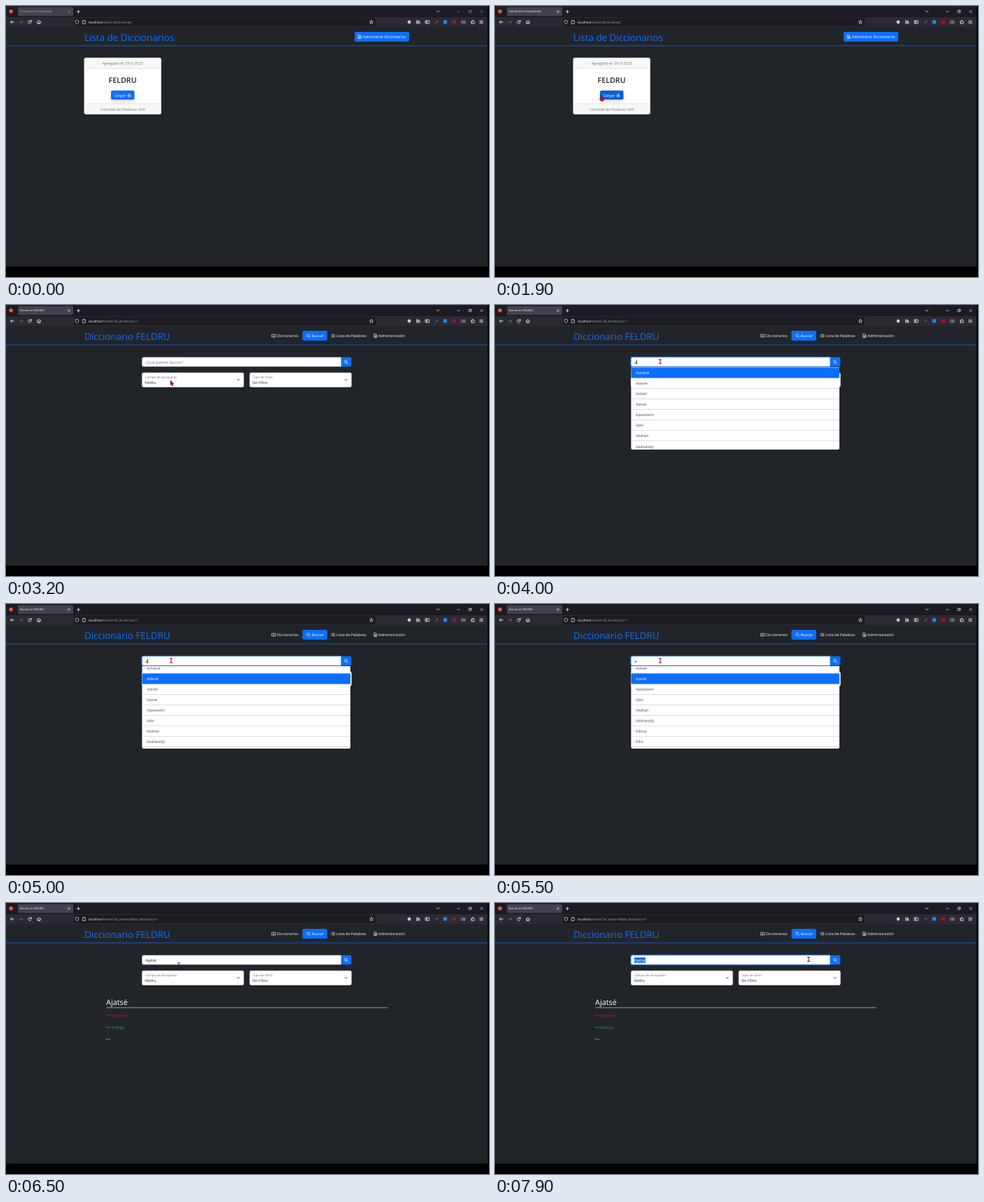
An HTML page with a canvas that plays this animation: 690 px wide and 388 px high, repeating every 8000 ms.

```html
<!DOCTYPE html>
<html lang="es">
<head>
<meta charset="utf-8">
<title>Diccionario</title>
<style>
  html, body { margin: 0; width: 100%; height: 100%; overflow: hidden; background: #000; }
  canvas { display: block; width: 690px; height: 388px; }
</style>
</head>
<body>
<canvas id="stage"></canvas>
<script>
const W = 690, H = 388, LOOP = 8000, STEP = 100;
const canvas = document.getElementById('stage');
const c = canvas.getContext('2d');
const dpr = window.devicePixelRatio || 1;
canvas.width = W * dpr;
canvas.height = H * dpr;

const BLUE = '#0d6efd', DARK = '#212529', GREY = '#6c757d', PALE = '#fbfbfe', RED = '#b3002d';
const NAME = 'FELDRU', NAME_LOW = 'Feldru', BODY = 5.42;
const WORDS = ['Achatrë', 'Adartë', 'Adrieh', 'Ajatsë', 'Ajaxetsem', 'Ajïkr',
  'Akálian', 'Akálian(ëj)', 'Alidue', 'Állin', 'Amárie'];

// Moments of the story in ms
const T = { active: 1200, home: 2300, focus: 3500, typed: 4000, down: 4900, enter: 5700,
  result: 5800, refocus: 7400, select: 7600 };

// Pointer path: time, x, y
const PATH = [[1300, 476, 382], [1400, 466, 366], [1600, 305, 107], [1800, 152, 128.5],
  [2300, 152, 128.5], [2700, 184, 138], [3100, 240, 136], [3200, 235, 108], [3400, 236, 81],
  [6400, 236, 81], [6500, 247, 89], [6700, 257, 102], [7000, 276, 101], [7300, 299, 81],
  [7400, 296, 81], [7600, 165, 81], [7900, 448, 80.5]];

function pointer(t) {
  if (t < PATH[0][0]) return null;
  let i = 0;
  while (i < PATH.length - 2 && PATH[i + 1][0] <= t) i++;
  const [t0, x0, y0] = PATH[i], [t1, x1, y1] = PATH[i + 1];
  const k = Math.min(1, (t - t0) / (t1 - t0));
  return { x: x0 + (x1 - x0) * k, y: y0 + (y1 - y0) * k };
}

// ---- drawing helpers ----
function rect(x, y, w, h, color) {
  c.fillStyle = color;
  c.fillRect(x, y, w, h);
}
function box(x, y, w, h, r, color, border) {
  c.beginPath();
  c.roundRect(x, y, w, h, r);
  if (color) { c.fillStyle = color; c.fill(); }
  if (border) { c.strokeStyle = border; c.lineWidth = 0.6; c.stroke(); }
}
function dot(x, y, r, color) {
  c.beginPath();
  c.arc(x, y, r, 0, 7);
  c.fillStyle = color;
  c.fill();
}
// y is the visual middle of the line
function text(s, x, y, size, color, weight = 400, align = 'left') {
  c.font = `${weight} ${size}px "Open Sans", "Noto Sans", sans-serif`;
  c.textAlign = align;
  c.fillStyle = color;
  c.fillText(s, x, y + size * 0.345);
  return c.measureText(s).width;
}
// Strokes an SVG path whose origin is the icon's middle
function icon(d, x, y, color = PALE, width = 0.8) {
  c.save();
  c.translate(x, y);
  c.strokeStyle = color;
  c.lineWidth = width;
  c.lineCap = c.lineJoin = 'round';
  c.stroke(new Path2D(d));
  c.restore();
}

const ICON = {
  close: 'M-1.5-1.5L1.5 1.5M1.5-1.5L-1.5 1.5',
  plus: 'M-2 0H2M0-2V2',
  down: 'M-1.8-.9L0 .9L1.8-.9',
  back: 'M2.4 0H-2.4M-.3-2.1L-2.4 0L-.3 2.1',
  forward: 'M-2.4 0H2.4M.3-2.1L2.4 0L.3 2.1',
  reload: 'M2-.8A2.2 2.2 0 1 0 2 1M2.2-2.6V-.8H.5',
  home: 'M-2.6 0L0-2.4L2.6 0M-1.9-.5V2.3H1.9V-.5M0 2.2V.8',
  shield: 'M0-2.6L2.2-1.8V0Q2 1.8 0 2.7Q-2 1.8-2.2 0V-1.8Z',
  page: 'M-1.8-2.5H.6L1.8-1.2V2.5H-1.8ZM.5-2.4V-1.1H1.7',
  star: 'M0-2.6L.8-.8L2.6-.7L1.2.5L1.7 2.4L0 1.4L-1.7 2.4L-1.2.5L-2.6-.7L-.8-.8Z',
  library: 'M-2.3-2.2V2.3M-.9-2.2V2.3M.4-1.6V2.3M1-1.5L2.5 2.2',
  panel: 'M-2.6-2H2.6V2H-2.6ZM-.5-2V2M-1.9-.8H-1.2M-1.9.3H-1.2',
  slash: 'M-1.7 1.9L1.5-1.3M1.1-2L2.1-.9',
  frame: 'M-2.5-1.9H2.5V1.9H-2.5ZM-1.4-.6V.8M0-.6V.8M1.4-.6V.8',
  puzzle: 'M-2.2-1H-.8V-2.3H.6V-1H2.1V2.3H-2.2V1.2H-1V.1H-2.2Z',
  menu: 'M-2.2-1.7H2.2M-2.2 0H2.2M-2.2 1.7H2.2',
  book: 'M0-1.5Q-1.4-2.4-2.7-1.8V1.9Q-1.3 1.4 0 2.1Q1.3 1.4 2.7 1.9V-1.8Q1.4-2.4 0-1.5V2',
  search: 'M1.3-.5A1.9 1.9 0 1 1-2.5-.5A1.9 1.9 0 1 1 1.3-.5M.8.9L2.5 2.6',
  list: 'M-1-1.7H2.5M-1 0H2.5M-1 1.7H2.5M-2.5-1.7H-2.3M-2.5 0H-2.3M-2.5 1.7H-2.3',
  file: 'M-1.9-2.6H.7L1.9-1.4V2.6H-1.9ZM-.9-.4H.9M-.9.6H.9M-.9 1.6H.5',
  load: 'M-1.1-.7H-2V2.2H2V-.7H1.1M0-2.5V.9M-.9 0L0 .9L.9 0',
  turn: 'M-2.6-1.7V.4H2.6M1.1-1L2.6.4L1.1 1.8'
};

// ---- browser ----
function browser(t) {
  const lit = t >= T.active ? PALE : '#8b8a94';
  rect(0, 0, 688, 15.5, '#1c1b22');
  rect(0, 15.5, 688, 14.5, '#2b2a33');
  dot(7.2, 7.8, 2.8, '#f0503c');
  box(17, 1.6, 79, 12.6, 1.6, '#42414d');
  text(t < T.home ? 'Diccionarios Disponibles' : 'Buscar en ' + NAME, 20, 8, 4.04, t >= T.active ? PALE : '#b0afb8');
  icon(ICON.close, 90, 8, lit, 0.6);
  icon(ICON.plus, 103.5, 8);
  icon(ICON.down, 617, 7.8);
  icon('M-1.7 0H1.7', 646.5, 8, lit, 0.6);
  icon('M-1.6-1.2H1.1V1.6H-1.6ZM-.8-1.9H1.8V.8', 663, 8, lit, 0.6);
  icon(ICON.close, 679.5, 8, lit, 0.6);

  icon(ICON.back, 9, 23);
  icon(ICON.forward, 21.5, 23, '#6b6a73');
  icon(ICON.reload, 34, 23);
  icon(ICON.home, 47, 23);
  box(97, 17, 431, 12, 1.6, '#1c1b22');
  icon(ICON.shield, 101.5, 23, PALE, 0.6);
  icon(ICON.page, 111.5, 23, PALE, 0.6);
  const path = t < T.home ? '/select-dictionaries/'
    : t < T.enter ? '/home/?id_dictionary=1' : '/home/?id_word=58&id_dictionary=1';
  const w = text('localhost', 118, 23, 4.65, PALE);
  text(path, 118 + w, 23, 4.65, '#a9a8b2');
  icon(ICON.star, 522, 23, PALE, 0.6);
  dot(576, 23, 2.4, '#c9c8d0');
  icon(ICON.library, 589, 23);
  icon(ICON.panel, 602, 23, PALE, 0.7);
  icon(ICON.slash, 615, 23, '#9a99a3', 0.7);
  rect(624.8, 20.2, 5.2, 5.2, '#2f7de8');
  rect(638, 20.4, 5, 5, '#a8101c');
  icon(ICON.frame, 653.5, 23, '#b5b4be', 0.6);
  icon(ICON.puzzle, 667, 23, PALE, 0.7);
  icon(ICON.menu, 679, 23, PALE, 0.7);
}

function header(title) {
  rect(0, 30, 688, 343, DARK);
  text(title, 112, 45, 13.4, BLUE);
  rect(0, 56.6, 688, 0.8, '#1861d6');
}

// ---- first page ----
function listPage(hover) {
  header('Lista de Diccionarios');
  box(498, 37, 78, 14, 2, BLUE);
  icon(ICON.file, 505.3, 44, '#fff', 0.6);
  text('Administrar Diccionarios', 509.6, 44.2, BODY, '#fff');

  box(111.8, 74.3, 109.8, 80.6, 2.2, '#fff', '#d0cbd8');
  box(112.2, 74.7, 109, 14.9, [2, 2, 0, 0], '#f7f7f7');
  box(112.2, 140, 109, 14.5, [0, 0, 2, 2], '#f7f7f7');
  rect(112, 89.4, 109.4, 0.5, '#d6d6d8');
  rect(112, 139.6, 109.4, 0.5, '#d6d6d8');
  text('Agregado el: 29-3-2023', 166.6, 82.6, BODY, GREY, 400, 'center');
  text(NAME, 166.6, 106, 10.7, DARK, 600, 'center');
  c.save();
  c.shadowColor = 'rgba(0,0,0,.18)';
  c.shadowBlur = 5 * dpr;
  c.shadowOffsetY = 2.5 * dpr;
  box(150, 121, 33.5, 13, 2, hover ? '#0b5ed7' : BLUE);
  c.restore();
  text('Cargar', 154.4, 127.8, BODY, '#fff');
  icon(ICON.load, 176, 127.8, '#fff', 0.6);
  text('Cantidad de Palabras: 629', 166.6, 147.8, 5.25, GREY, 400, 'center');
}

// ---- second page ----
function navItem(glyph, x, label, textX) {
  icon(glyph, x, 44, '#fff', 0.6);
  text(label, textX, 44.2, BODY, '#fff');
}
function picker(x, label, value) {
  box(x, 97, 145.2, 20.5, 2, '#fff', '#ced4da');
  text(label, x + 4.5, 103.6, 4.63, GREY);
  text(value, x + 3.8, 110.8, BODY, DARK);
  icon(ICON.down, x + 137.6, 107.2, '#343a40', 0.8);
}
function caret(x) {
  rect(x, 78.2, 0.7, 7, '#111');
}

function field(t) {
  const focus = (t >= T.focus && t < T.result) || t >= T.refocus;
  if (focus) box(192.8, 73.4, 287, 16.2, 3, 'rgba(13,110,253,.5)');
  box(478, 74.8, 15.4, 13.4, [0, 2, 2, 0], BLUE);
  icon(ICON.search, 486, 81.6, '#fff', 0.7);
  box(194.5, 74.9, 284, 13.2, [2, 0, 0, 2], '#fff', focus ? '#86b7fe' : '#ced4da');
  const blinkOn = t < 4200 || (t >= 4700 && t < 5200);
  if (t < T.typed) {
    text('¿Que quieres buscar?', 199.3, 82, BODY, GREY);
    if (focus) caret(199);
  } else if (t < T.enter) {
    text('a', 199.3, 82, BODY, DARK);
    if (blinkOn) caret(202.3);
  } else {
    const picked = t >= T.select;
    if (picked) rect(199, 78, 16, 7.6, '#0f6fd0');
    text(WORDS[3], 199.3, 82, BODY, picked ? '#fff' : DARK);
    if (focus && !picked) caret(215.5);
  }
}

// Three key presses, each easing the list one row further
function suggestions(t) {
  const row = 15.05, top = 89, height = 118;
  const presses = t < T.down ? 0 : Math.min(3, 1 + Math.floor((t - T.down) / 200));
  const goal = n => Math.max(0, n * row - 10);
  let scroll = 0;
  if (presses) {
    const k = Math.min(1, (t + STEP - T.down - (presses - 1) * 200) / 200);
    const ease = 1 - (1 - k) * (1 - k);
    scroll = goal(presses - 1) + (goal(presses) - goal(presses - 1)) * ease;
  }
  c.save();
  c.beginPath();
  c.roundRect(194.4, top, 297.6, height, [0, 0, 2, 2]);
  c.clip();
  rect(194, top, 299, height, '#fff');
  WORDS.forEach((word, i) => {
    const y = top + 0.5 + i * row - scroll, on = i === presses;
    if (on) rect(194, y, 299, row, BLUE);
    else rect(194, y + row - 0.5, 299, 0.6, '#c4c8cd');
    text(word, 201, y + 7.8, BODY, on ? '#fff' : '#4a4f55');
  });
  c.restore();
}

function entry() {
  text(WORDS[3], 143, 142.6, 10.9, '#fff');
  rect(143, 149.5, 402, 0.8, '#b4b7ba');
  icon(ICON.turn, 146, 160.4, '#c4193f', 0.7);
  text("['a·ʝa·t͡sə]", 151, 160.8, BODY, '#c4193f');
  icon(ICON.turn, 146, 177.8, '#1b9a55', 0.7);
  text('Energía', 151, 178.2, BODY, '#1b9a55');
  icon(ICON.turn, 146, 195, '#2f9fd0', 0.7);
}

function homePage(t) {
  header('Diccionario ' + NAME);
  box(423.5, 37, 35.5, 14, 2, BLUE);
  navItem(ICON.book, 382.3, 'Diccionarios', 387);
  navItem(ICON.search, 432.3, 'Buscar', 436.8);
  navItem(ICON.list, 467.3, 'Lista de Palabras', 472);
  navItem(ICON.file, 528, 'Administración', 532);
  picker(194.4, 'Campo de Busqueda', NAME_LOW);
  picker(348.2, 'Tipo de texto', 'Sin Filtro');
  field(t);
  if (t >= T.typed && t < T.enter) suggestions(t);
  if (t >= T.result) entry();
}

// ---- pointer ----
function drawPointer(p, kind) {
  c.save();
  if (kind === 'beam') {
    c.beginPath();
    c.rect(0, 0, W, 88.4);
    c.clip();
    icon('M-1.7-3H1.7M0-3V3M-1.7 3H1.7', p.x, p.y, RED, 1.1);
  } else {
    c.translate(p.x, p.y);
    const shape = new Path2D(kind === 'hand'
      ? 'M-.7.2Q0-.6.7.2V2.8L3 3.4Q3.6 3.7 3.4 4.8L2.7 7.6H-.6L-2.6 4.6Q-2.2 3.6-.7 4.6Z'
      : 'M0 0V6.6L1.5 5.3L2.7 8L3.8 7.5L2.7 4.9H4.7Z');
    c.lineJoin = 'round';
    c.lineWidth = 0.5;
    c.strokeStyle = '#5a0018';
    c.fillStyle = kind === 'hand' ? '#d4101c' : RED;
    c.fill(shape);
    c.stroke(shape);
  }
  c.restore();
}

function draw(t) {
  c.setTransform(dpr, 0, 0, dpr, 0, 0);
  c.textRendering = 'geometricPrecision';
  rect(0, 0, W, H, '#000');
  const p = pointer(t), first = t < T.home;
  const onButton = first && p && p.x >= 150 && p.x <= 183.5 && p.y >= 121 && p.y <= 134;
  const onField = !first && p && p.y > 74.5 && p.y < 90 && (p.x > 194 || t >= T.refocus);
  if (first) listPage(onButton); else homePage(t);
  browser(t);
  if (p) drawPointer(p, onButton ? 'hand' : onField ? 'beam' : 'arrow');
  rect(688, 0, 2, H, '#000');
  rect(0, 373, W, 15, '#000');
}

const start = performance.now();
function tick() {
  const t = (performance.now() - start) % LOOP;
  draw(Math.floor(t / STEP) * STEP);
  requestAnimationFrame(tick);
}
tick();
</script>
</body>
</html>
```
